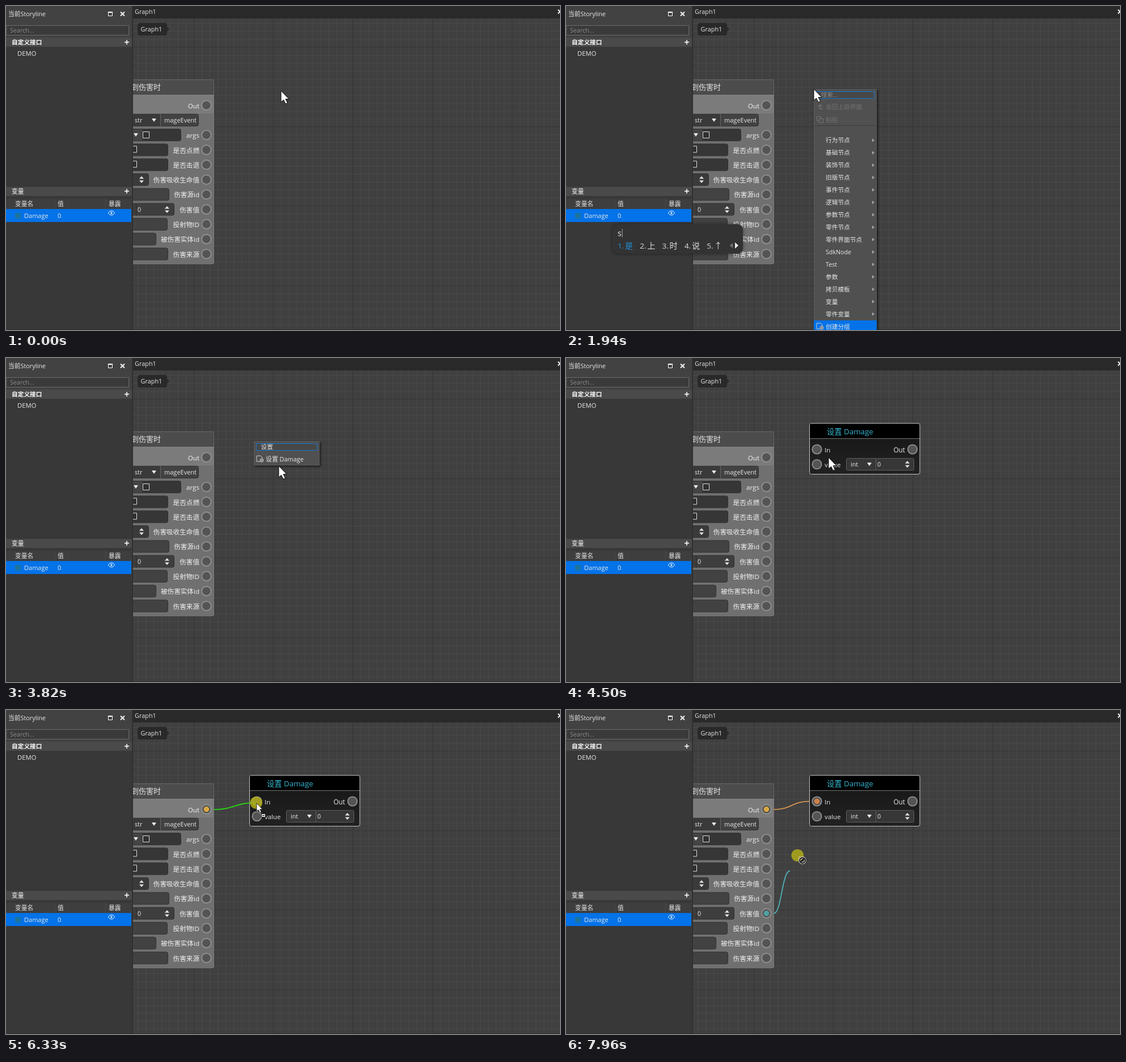
An HTML page with a canvas for the animation above (8000 ms loop, 977 by 573 pixels).

```html
<!DOCTYPE html>
<html lang="zh">
<head>
<meta charset="utf-8">
<style>
html, body { margin: 0; width: 100%; height: 100%; overflow: hidden; background: #383838; }
canvas { display: block; }
</style>
</head>
<body>
<canvas id="stage" width="977" height="573"></canvas>
<script>
const ctx = document.getElementById('stage').getContext('2d');
const LOOP = 8000;
const FONT = '"Open Sans", "Noto Sans CJK SC", "Noto Sans CJK JP", sans-serif';
const WHITE = '#e8e8e8', BLUE = '#0472e8', ORANGE = '#e8a050', TEAL = '#50b8c0';

// Pointer moves: start, end, x, y. The screen refreshes in steps of about 70 ms.
const moves = [
  [200, 620, 437, 147], [3680, 3820, 481, 191], [4020, 4230, 463, 176],
  [5030, 5300, 340, 179], [5500, 5570, 354, 176], [5780, 6260, 434, 162],
  [6330, 6330, 442, 165], [6470, 6610, 448, 163], [6870, 7620, 355, 361],
  [7820, 7960, 409, 258]
];
const presses = [[820, 1150], [4230, 4440], [5640, 6400], [7750, 8000]];
const typing = [[1940, 's'], [2010, 'sh'], [2080, 'she'], [2150, 'shez'], [2290, 'shezh'], [2360, 'shezhi']];
const menuItems = ['行为节点', '基础节点', '装饰节点', '旧版节点', '事件节点', '逻辑节点', '参数节点',
  '零件节点', '零件界面节点', 'SdkNode', 'Test', '参数', '拷贝模板', '变量', '零件变量'];

const within = (t, a, b) => t >= a && t < b;

function pointerAt(t) {
  let x = 485, y = 150;
  for (const [start, end, toX, toY] of moves) {
    if (t < start) break;
    const count = Math.max(1, Math.floor((end - start) / 70));
    const step = (end - start) / count || 1;
    const u = Math.min(1, (Math.floor((t - start) / step + 0.001) + 1) / (count + 1));
    const k = end === start ? 1 : u * u * (3 - 2 * u);
    x += (toX - x) * k;
    y += (toY - y) * k;
  }
  return { x, y };
}

function rect(x, y, w, h, fill, stroke, r = 0) {
  ctx.beginPath();
  ctx.roundRect(x, y, w, h, r);
  if (fill) { ctx.fillStyle = fill; ctx.fill(); }
  if (stroke) { ctx.strokeStyle = stroke; ctx.lineWidth = 1; ctx.stroke(); }
}

function text(str, x, y, size = 10.8, color = WHITE, align = 'left', weight = '') {
  ctx.font = `${weight} ${size}px ${FONT}`;
  ctx.textAlign = align;
  ctx.fillStyle = color;
  ctx.fillText(str, x, y + size * 0.36);
}

function line(points, color, width = 1) {
  ctx.beginPath();
  points.forEach(([x, y]) => ctx.lineTo(x, y));
  ctx.strokeStyle = color;
  ctx.lineWidth = width;
  ctx.stroke();
}

function poly(points, color) {
  ctx.beginPath();
  points.forEach(([x, y]) => ctx.lineTo(x, y));
  ctx.closePath();
  ctx.fillStyle = color;
  ctx.fill();
}

function disc(x, y, r, fill, stroke, width = 1) {
  ctx.beginPath();
  ctx.arc(x, y, r, 0, 7);
  if (fill) { ctx.fillStyle = fill; ctx.fill(); }
  if (stroke) { ctx.strokeStyle = stroke; ctx.lineWidth = width; ctx.stroke(); }
}

const downArrow = (x, y) => poly([[x - 4, y - 3], [x + 4, y - 3], [x, y + 3]], WHITE);

function spinner(x, y) {
  poly([[x - 4, y - 1.5], [x + 4, y - 1.5], [x, y - 6]], WHITE);
  poly([[x - 4, y + 1.5], [x + 4, y + 1.5], [x, y + 6]], WHITE);
}

function plus(x, y) {
  line([[x - 4, y], [x + 4, y]], '#fff', 1.6);
  line([[x, y - 4], [x, y + 4]], '#fff', 1.6);
}

function cross(x, y, r) {
  line([[x - r, y - r], [x + r, y + r]], '#fff', 1.8);
  line([[x - r, y + r], [x + r, y - r]], '#fff', 1.8);
}

function port(x, y, core) {
  disc(x, y, 8.2, '#545454', '#929292', 1.8);
  if (core) disc(x, y, 4.8, core);
}

function drawGrid() {
  rect(224, 22, 753, 551, '#404040');
  const cell = 14.04;
  for (const major of [false, true]) {
    const gap = major ? cell * 10 : cell;
    const color = major ? '#343434' : '#494949';
    for (let x = 472 - 140.4 * 2; x < 977; x += gap) {
      const px = Math.round(x) - 0.5;
      if (px > 224) line([[px, 22], [px, 573]], color);
    }
    for (let y = 73.5 - 140.4; y < 573; y += gap) {
      const py = Math.round(y) - 0.5;
      if (py > 22) line([[224, py], [977, py]], color);
    }
  }
}

function drawPanel() {
  rect(0, 0, 222, 573, '#383838');
  rect(0, 0, 222, 56, '#424242');
  text('当前Storyline', 4, 14.5);
  rect(180.5, 10.5, 7, 7, null, '#fff');
  line([[180, 11], [188, 11]], '#fff', 2);
  cross(205.5, 14, 3.5);
  rect(0.5, 34.5, 216, 17, '#3a3a3a', '#6c6c6c');
  text('Search...', 7, 43.5, 10.8, '#8a8a8a');
  rect(0, 56, 222, 16, '#4a4a4a');
  text('自定义接口', 10, 64.5, 10.7, '#fff', 'left', 'bold');
  plus(213, 64);
  text('DEMO', 20, 84, 11.3);

  rect(0, 320, 222, 16, '#4a4a4a');
  text('变量', 10, 328, 10.8, '#fff');
  plus(213, 327.5);
  rect(0, 341, 222, 18, '#3e3e3e');
  text('变量名', 16, 350);
  text('值', 91, 350);
  text('暴露', 181, 350);
  line([[85.5, 341], [85.5, 359]], '#484848');
  line([[175.5, 341], [175.5, 359]], '#484848');
  rect(0, 359, 221, 23, BLUE);
  rect(16, 366, 10, 10, '#19759f', null, 2);
  text('Damage', 32, 371, 11);
  text('0', 91, 371, 11);
  ctx.beginPath();
  ctx.ellipse(186, 366, 5.2, 3.6, 0, 0, 7);
  ctx.strokeStyle = '#fff';
  ctx.lineWidth = 1;
  ctx.stroke();
  disc(186, 366, 1.6, '#fff');
  rect(222, 0, 2, 573, '#303030');
}

function drawTabs() {
  rect(224, 0, 753, 22, '#2a2a2a');
  text('Graph1', 227, 10.5, 10.9);
  cross(977, 10, 3.5);
  rect(232, 30, 52, 22, '#292929', null, 4);
  poly([[284, 37], [288, 41], [284, 45]], '#292929');
  text('Graph1', 237.5, 41, 10.9);
}

const rowY = k => 175.5 + 26.3 * k;

function drawEventNode(t) {
  ctx.save();
  ctx.beginPath();
  ctx.rect(224, 22, 753, 551);
  ctx.clip();
  rect(150, 130, 217, 326.5, '#707070', null, 3);
  rect(150, 130, 217, 27, '#4c4c4c', null, [3, 3, 0, 0]);
  rect(150, 158, 216, 32, '#7b7b7b');
  line([[224, 157.5], [367, 157.5]], '#858585');
  rect(150.5, 130.5, 216, 325.5, null, 'rgba(130,130,130,.45)', 3);
  text('到伤害时', 273, 143.5, 13, WHITE, 'right');

  const field = (k, right, fill = '#424242') =>
    rect(150.5, rowY(k) - 10.5, right - 151, 21, fill, '#303030', 3);
  const checkbox = (x, y) => rect(x + 0.5, y + 0.5, 11, 11, '#303030', '#ddd');

  field(1, 340);
  rect(150, 192, 122, 20, '#3a3a3a');
  line([[272.5, 191], [272.5, 213]], '#666');
  text('str', 227, 202.5, 10.8);
  downArrow(261, 202);
  text('mageEvent', 279, 202.5, 11);
  field(2, 309, '#363636');
  rect(150, 218, 90, 20, '#444');
  downArrow(229, 228);
  checkbox(241, 222);
  for (const k of [3, 4]) {
    field(k, 286, '#363636');
    checkbox(219, rowY(k) - 7);
  }
  field(5, 252, '#3a3a3a');
  spinner(239, 307);
  field(6, 288);
  field(7, 297, '#3e3e3e');
  line([[229.5, 350], [229.5, 371]], '#2c2c2c');
  text('0', 232, 360.5, 10.8);
  spinner(284, 360);
  field(8, 285);
  field(9, 265);
  field(10, 286);

  const labels = ['Out', '', 'args', '是否点燃', '是否击退', '伤害吸收生命值', '伤害源id', '伤害值',
    '投射物ID', '被伤害实体id', '伤害来源'];
  labels.forEach((label, k) => {
    if (!label) return;
    text(label, 341, rowY(k) + 1, 11.6, '#f2f2f2', 'right');
    const core = k === 0 && t >= 5710 ? '#d8a840' : k === 7 && t >= 7820 ? '#50a0a4' : null;
    port(353.5, rowY(k), core);
  });
  ctx.restore();
}

function drawSetterNode(t) {
  const body = ctx.createLinearGradient(0, 142, 0, 206);
  body.addColorStop(0, '#191919');
  body.addColorStop(1, '#222');
  rect(429, 115.5, 195, 90, body, null, 3);
  rect(429, 115.5, 195, 27, '#000', null, [3, 3, 0, 0]);
  line([[429, 142.5], [624, 142.5]], '#777');
  rect(429.5, 115.5, 194.5, 90, null, '#c4c4c4', 3);
  text('设置 Damage', 460, 130, 13.3, '#35b8d4');
  port(442.5, 161.5, t >= 6470 ? '#d08048' : null);
  port(442.5, 188);
  port(611, 161.5);
  text('In', 456, 162.5, 11.6);
  text('value', 456, 189, 11.4);
  text('Out', 598, 162.5, 11.8, WHITE, 'right');
  rect(494.5, 177.5, 119, 21, '#373737', '#5c5c5c', 2);
  line([[546.5, 178], [546.5, 198]], '#5c5c5c');
  text('int', 502, 188.5, 10.8);
  downArrow(535, 188);
  text('0', 549, 188.5, 10.8);
  spinner(602, 188);
}

function wire(x1, y1, x2, y2, color) {
  const mid = (x1 + x2) / 2;
  ctx.beginPath();
  ctx.moveTo(x1, y1);
  ctx.bezierCurveTo(mid, y1, mid, y2, x2, y2);
  ctx.strokeStyle = color;
  ctx.lineWidth = 1.7;
  ctx.stroke();
}

function drawWires(t) {
  const end = pointerAt(t - 70);
  if (within(t, 5780, 6330)) wire(366, 176, end.x, end.y, ORANGE);
  if (within(t, 6330, 6470)) wire(366, 176, 440, 164, '#28e010');
  if (t >= 6470) wire(366, 176, 430, 161.5, ORANGE);
  if (t >= 7820) wire(366, 360, end.x, end.y, TEAL);
}

function pageIcon(x, y) {
  line([[x + 5, y + 5], [x - 5, y + 5], [x - 5, y - 5], [x + 2, y - 5], [x + 5, y - 2], [x + 5, y]], '#ccc');
  disc(x + 4, y + 3, 3, '#4c4c4c', '#ccc');
  line([[x + 2, y + 3], [x + 6, y + 3]], '#ccc');
  line([[x + 4, y + 1], [x + 4, y + 5]], '#ccc');
}

function menuFrame(width, height) {
  ctx.save();
  ctx.shadowColor = 'rgba(0,0,0,.6)';
  ctx.shadowBlur = 4;
  ctx.shadowOffsetX = ctx.shadowOffsetY = 2;
  rect(437, 147, width, height, '#505050');
  ctx.restore();
  rect(437.5, 147.5, width - 1, height - 1, null, '#5c5c5c');
  rect(441.5, 151.5, width - 9, 12, '#484848', '#1474d0');
}

function drawMenu(t) {
  menuFrame(111, 450);
  const committed = t >= 2500;
  text(committed ? '设置' : '搜索...', 449.5, 157.5, 10.7, committed ? WHITE : '#8c8c8c');
  if (within(t, 1080, 1610) || within(t, 2140, 2500)) line([[449.5, 152], [449.5, 162]], '#eee');
  const muted = '#717171';
  line([[453, 182], [448, 182], [448, 175], [444, 178]], muted, 1.5);
  line([[448, 174], [452, 178]], muted, 1.5);
  text('返回上级界面', 458, 178.5, 10.7, muted);
  rect(442.5, 195.5, 7, 8, null, muted);
  rect(446.5, 199.5, 7, 7, '#505050', muted);
  text('粘贴', 458, 201, 10.7, muted);
  line([[438, 211.5], [547, 211.5]], '#3c3c3c');
  menuItems.forEach((label, i) => {
    const y = 237.5 + 21.95 * i;
    text(label, 458, y, 10.7);
    poly([[540, y - 3], [544, y], [540, y + 3]], '#aaa');
  });
  rect(437, 556, 111, 17, BLUE);
  pageIcon(447, 566);
  text('创建分组', 458, 567, 10.7);
}

function drawFilteredMenu(t) {
  menuFrame(116, 43);
  if (t >= 4160) rect(438, 168, 114, 21, BLUE);
  text('设置', 449.5, 157.5, 10.7);
  if (within(t, 2890, 3480)) line([[474.5, 152], [474.5, 162]], '#eee');
  pageIcon(447, 178);
  text('设置 Damage', 458, 179, 10.9);
}

function drawInputMethod(t) {
  const typed = typing.filter(([time]) => t >= time).pop()[1];
  const words = typed.length > 3 ? ['设置', '摄制', '设', '社', '射']
    : typed === 'she' ? ['设', '社', '射', '蛇', '舍'] : ['是', '上', '时', '说', '↑'];
  const wide = typed.length > 3 ? 30 : 0;
  ctx.save();
  ctx.shadowColor = 'rgba(0,0,0,.45)';
  ctx.shadowBlur = 6;
  rect(82, 386, 230 + wide, 52, '#333', null, 9);
  ctx.restore();
  text(typed, 91, 402, 14);
  const caretX = 92.5 + ctx.measureText(typed).width;
  line([[caretX, 394], [caretX, 409]], '#aaa');
  let x = 91;
  words.forEach((word, i) => {
    text(`${i + 1}.`, x, 424, 13.5, i ? '#ddd' : '#2090d8');
    text(word, x + 13, 423.5, 14.2, i ? '#ddd' : '#2090d8');
    x += 25 + word.length * 14.3;
  });
  poly([[294 + wide, 419], [294 + wide, 428], [289 + wide, 423.5]], '#777');
  poly([[298 + wide, 418], [298 + wide, 429], [304 + wide, 423.5]], '#eee');
}

function arrowCursor(x, y, scale) {
  ctx.save();
  ctx.translate(x, y);
  ctx.scale(scale, scale);
  const shape = [[0, 0], [0, 20], [4.5, 16], [8, 23], [11.5, 21.5], [8, 14.5], [14, 14.5]];
  ctx.shadowColor = 'rgba(0,0,0,.5)';
  ctx.shadowBlur = 2;
  poly(shape, '#fff');
  ctx.shadowColor = 'transparent';
  line([...shape, shape[0]], '#111', 1);
  ctx.restore();
}

function forbiddenCursor(x, y) {
  ctx.setLineDash([2, 2]);
  rect(x + 1.5, y + 1.5, 9, 9, null, '#ddd');
  ctx.setLineDash([]);
  disc(x + 8, y + 8, 4.8, null, '#ddd', 3.5);
  disc(x + 8, y + 8, 4.8, null, '#111', 2);
  line([[x + 5, y + 11], [x + 11, y + 5]], '#111', 2);
}

function drawPointer(t) {
  const { x, y } = pointerAt(t);
  if (presses.some(([a, b]) => within(t, a, b))) disc(x - 0.8, y - 1, 10.8, 'rgba(180,176,24,.82)');
  if (within(t, 5780, 6330) || t >= 7820) {
    forbiddenCursor(x, y);
  } else if (within(t, 6330, 6400)) {
    arrowCursor(x, y, 0.72);
    rect(x + 8.5, y + 18.5, 7, 6, '#fff', '#111');
    line([[x + 10, y + 21.5], [x + 14, y + 21.5]], '#111', 1.5);
  } else {
    arrowCursor(x, y, 1);
  }
}

function draw(t) {
  drawGrid();
  drawEventNode(t);
  if (t >= 4440) drawSetterNode(t);
  drawWires(t);
  drawTabs();
  drawPanel();
  rect(0, 572, 977, 1, '#2c2c2c');
  if (within(t, 1080, 2620)) drawMenu(t);
  if (within(t, 2690, 4370)) drawFilteredMenu(t);
  if (within(t, 1940, 2500)) drawInputMethod(t);
  drawPointer(t);
}

function tick() {
  draw(performance.now() % LOOP);
  requestAnimationFrame(tick);
}
tick();
</script>
</body>
</html>
```
